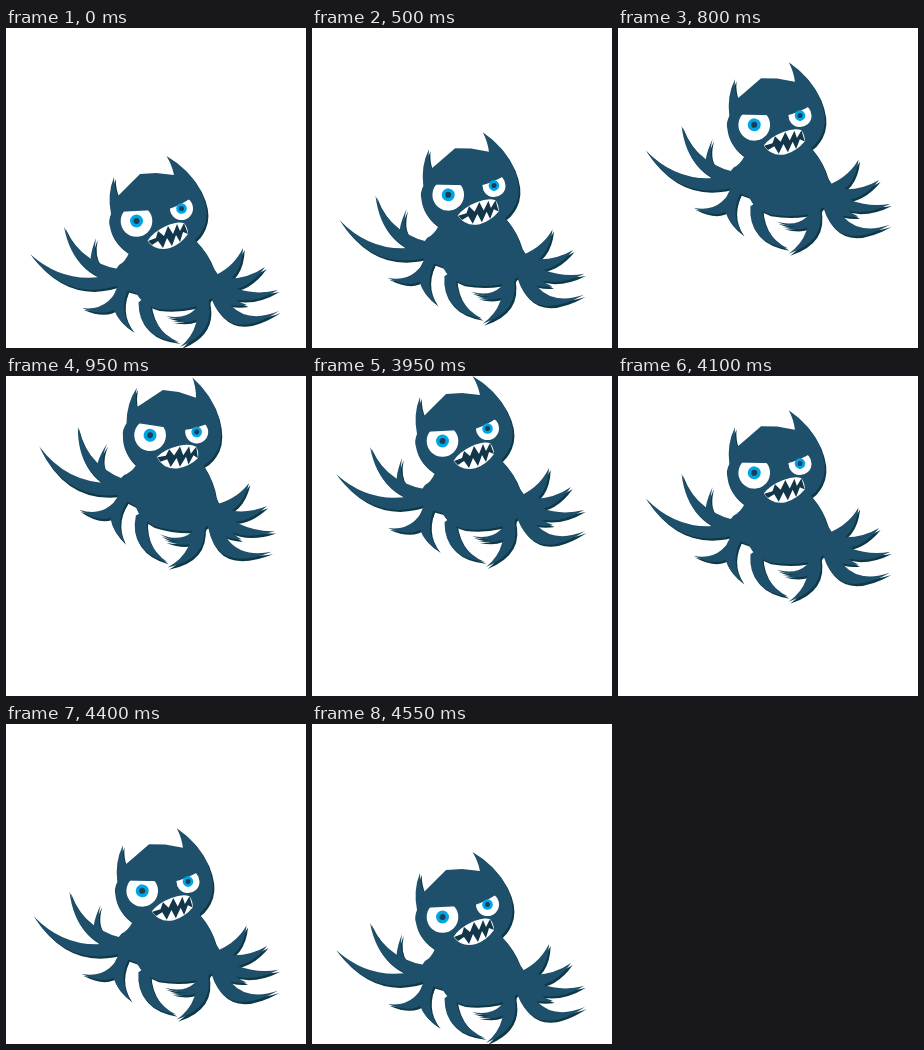
Write an HTML page that moves like this. It is 300 px wide and 320 px high and loops after 6550 ms.

```html
<!DOCTYPE html>
<html lang="en">
<head>
<meta charset="utf-8">
<title>Bouncing monster</title>
<style>
html, body { margin: 0; width: 100%; height: 100%; overflow: hidden; background: #fff; }
svg { display: block; width: 100%; height: 100%; }
</style>
</head>
<body>
<svg viewBox="0 0 300 320">
  <defs>
    <g id="shape">
      <path d="M108 149 Q108 160 112 168 Q121 159 134 146 L150 145 L168 147 Q166 137 160.500 128 Q183 141 194 162 Q203 180 200 193 Q197 205 189 212 Q201 224 207 240 Q216 250 211 262 Q204 276 188 279 Q170 283 152 281 Q137 277 130 265 L112 260 Q104 248 113 237 Q119 234 123 225 Q107 216 104 199 Q102 193 105 186 Q101 166 108 149Z"/>
      <g id="arms"></g>
    </g>
    <clipPath id="leftLid"><path d="M110 184 L150 182 V215 H110Z"/></clipPath>
    <clipPath id="rightLid"><path d="M160 182 Q176 177 186 169 L195 170 V198 H160Z"/></clipPath>
  </defs>
  <g id="monster">
    <use href="#shape" x="1.700" y="2" fill="#0d3846"/>
    <use href="#shape" fill="#1f506b"/>
    <circle cx="130.500" cy="193" r="15.800" fill="#fff" clip-path="url(#leftLid)"/>
    <circle cx="130.500" cy="193" r="6.500" fill="#00a5e6"/>
    <circle cx="130.500" cy="193" r="3" fill="#173f56"/>
    <circle cx="175.500" cy="180.500" r="11.500" fill="#fff" clip-path="url(#rightLid)"/>
    <circle cx="175.500" cy="180.500" r="5.300" fill="#00a5e6"/>
    <circle cx="175.500" cy="180.500" r="2.500" fill="#173f56"/>
    <path d="M141.500 213 Q147 204 160 198 Q171 193 178 195 Q182 200 182 206 Q175 216 164 220 Q150 224 141.500 213Z" fill="#fff"/>
    <path d="M142 213 L150 210 L152 203 L158 208 L162 198 L167 206 L171 196 L174 203 L178 195 L182 206 L177 204 L174 214 L170 207 L166 218 L161 210 L157 220 L152 213 L146 217Z" fill="#12364a"/>
  </g>
</svg>
<script>
(() => {
  // A curved, tapering arm; bend is relative to its length.
  function armPath([x, y], [tx, ty], bend, width) {
    const dx = tx - x, dy = ty - y;
    const half = width / 2 / Math.hypot(dx, dy);
    const nx = -dy * half, ny = dx * half;
    const cx = (x + tx) / 2 - dy * bend, cy = (y + ty) / 2 + dx * bend;
    return `M${x + nx} ${y + ny}Q${cx + nx} ${cy + ny} ${tx} ${ty}` +
      `Q${cx - nx} ${cy - ny} ${x - nx} ${y - ny}Z`;
  }

  const arms = document.getElementById('arms');
  function grow(root, bend, width, ...tips) {
    for (const tip of tips) {
      arms.insertAdjacentHTML('beforeend', `<path d="${armPath(root, tip, bend, width)}"/>`);
    }
  }

  const shoulder = [121, 248], hip = [118, 257], side = [206, 255];
  grow(shoulder, -0.35, 14, [24, 226], [58, 199]);
  grow(shoulder, -0.75, 14, [90, 210]);
  grow(hip, -0.5, 13, [76, 280]);
  grow(hip, 0.4, 13, [127, 303]);
  grow([138, 270], 0.4, 14, [173, 314]);
  grow([195, 267], -0.4, 14, [174, 319]);
  grow([201, 263], -0.55, 8, [160, 288], [166, 293]);
  grow(side, 0.28, 13, [237, 220], [259, 239], [272, 262], [241, 277]);
  grow(side, 0.62, 17, [273, 283]);

  const pivot = { x: 152.7, y: 212.3 };
  const pose = (x, y, turn) => ({ x, y, turn });
  const lift = (p, dy) => ({ ...p, y: p.y - dy });
  const low = pose(pivot.x, pivot.y, 0);
  const rise = pose(157, 187.7, 4.1);
  const middle = pose(147.7, 151, -8);
  const peak = pose(162, 82.6, 11.5);
  const upper = lift(rise, 70);
  const path = [low, rise, middle, upper, peak, lift(low, 128), upper, middle, rise, low];

  const loop = 6550, step = 150;
  const stepsSince = (t, from, max) =>
    Math.max(0, Math.min(max, Math.floor((t - from) / step) + 1));

  const monster = document.getElementById('monster');
  function draw(t) {
    const p = path[stepsSince(t, 500, 4) + stepsSince(t, 3950, 5)];
    monster.setAttribute('transform',
      `translate(${p.x} ${p.y}) rotate(${p.turn}) translate(${-pivot.x} ${-pivot.y})`);
  }

  const start = performance.now();
  function tick() {
    draw((performance.now() - start) % loop);
    requestAnimationFrame(tick);
  }
  tick();
})();
</script>
</body>
</html>
```
